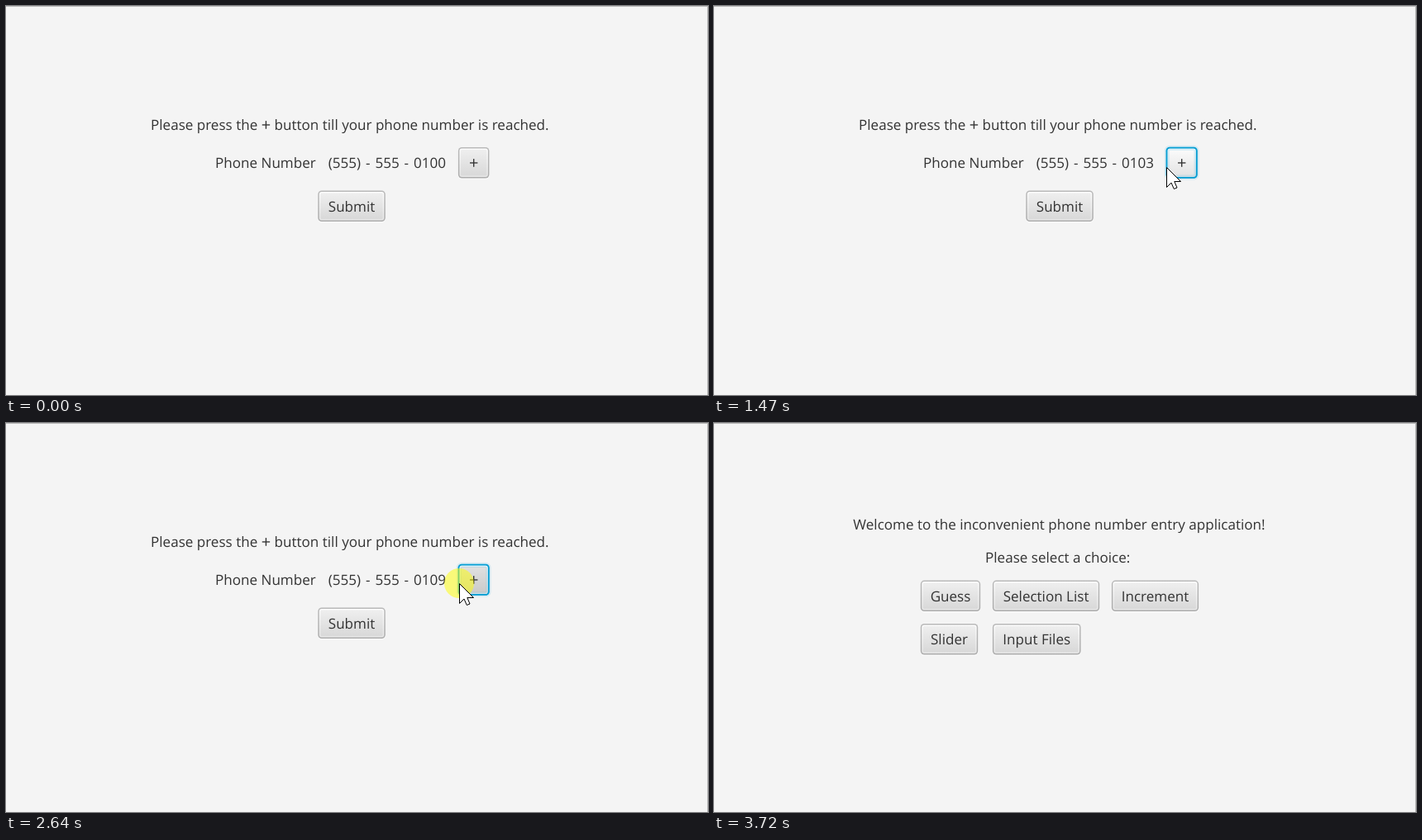
Animation of 849 by 471 pixels, one loop 3810 ms. Source, as an HTML page:

```html
<!DOCTYPE html>
<html lang="en">
<head>
<meta charset="utf-8">
<title>Phone number entry</title>
<style>
  html, body { margin: 0; width: 100%; height: 100%; overflow: hidden; background: #f4f4f4; }
  svg { display: block; width: 849px; height: 471px; }
  text { font: 17.07px "Open Sans", "Noto Sans", sans-serif; fill: #333; text-rendering: geometricPrecision; }
  .button text { text-anchor: middle; }
  .plus { font-size: 20px; baseline-shift: -1px; }
  #number { word-spacing: 1.5px; }
  .edge { fill: #b9b9b9; }
  .shadow { fill: #fff; opacity: .5; }
  .border { fill: url(#outer); }
  .bevel { fill: url(#inner); }
  .body { fill: url(#normal); }
  .hover .body { fill: url(#hover); }
  .pressed .body { fill: url(#pressed); }
  .ring, .glow { display: none; }
  .focused .ring, .focused .glow { display: inline; }
  .ring { fill: #039ed3; }
  .glow { fill: #039ed3; opacity: .13; }
  #halo { fill: #ff0; opacity: .5; }
  #arrow { fill: #fff; stroke: #000; stroke-width: 1; stroke-linejoin: round; }
</style>
</head>
<body>
<svg viewBox="0 0 849 471">
  <defs id="defs"></defs>
  <rect width="849" height="471" fill="#f4f4f4"/>
  <g id="counter">
    <text x="175" y="150">Please press the <tspan class="plus">+</tspan> button till your phone number is reached.</text>
    <text x="253" y="196">Phone Number</text>
    <text id="number" x="389.7" y="196"></text>
  </g>
  <g id="menu">
    <text x="168.3" y="129">Welcome to the inconvenient phone number entry application!</text>
    <text x="328" y="169">Please select a choice:</text>
  </g>
  <rect class="edge" width="849" height="1"/>
  <rect class="edge" x="848" width="1" height="471"/>
  <g id="pointer">
    <circle id="halo" r="18"/>
    <path id="arrow" d="M.5 .5V24.5L6 19L9.3 26.5L13 25L9.8 17.5H17.5Z"/>
  </g>
</svg>
<script>
const LOOP = 3810;
const MENU_AT = 3110;
const LEAVE_AT = 3720;
const SUBMIT_AT = 3030;

const byId = id => document.getElementById(id);

function make(parent, tag, attrs) {
  const node = document.createElementNS("http://www.w3.org/2000/svg", tag);
  for (const key in attrs) node.setAttribute(key, attrs[key]);
  return parent.appendChild(node);
}

function gradient(id, top, bottom) {
  const node = make(byId("defs"), "linearGradient", { id, x2: 0, y2: 1 });
  make(node, "stop", { offset: 0, "stop-color": top });
  make(node, "stop", { offset: 1, "stop-color": bottom });
}

gradient("outer", "#b9b9b9", "#acacac");
gradient("inner", "#fdfdfd", "#e6e6e6");
gradient("normal", "#eeeeee", "#d9d9d9");
gradient("hover", "#fafafa", "#e4e4e4");
gradient("pressed", "#dfdfdf", "#cbcbcb");

function button(parent, label, x, y, w, labelClass = "") {
  const h = 37.5;
  const node = make(parent, "g", { class: "button" });
  const layer = (name, inset, rx, dy = 0) => make(node, "rect", {
    class: name, x: x + inset, y: y + inset + dy,
    width: w - 2 * inset, height: h - 2 * inset, rx
  });
  layer("shadow", 0, 4.5, 1.5);
  layer("border", 0, 4.5);
  layer("ring", -.3, 4.5);
  layer("bevel", 1.5, 3);
  layer("body", 3, 1.5);
  layer("glow", -2.1, 6);
  layer("body", 3.9, 1);
  const text = make(node, "text", { x: x + w / 2, y: y + 25.3 });
  make(text, "tspan", { class: labelClass }).textContent = label;
  return {
    contains: p => p && p[0] >= x && p[0] <= x + w && p[1] >= y && p[1] <= y + h,
    show(states) {
      for (const name in states) node.classList.toggle(name, states[name]);
    }
  };
}

const plus = button(byId("counter"), "+", 546.9, 171, 37.5, "plus");
const submit = button(byId("counter"), "Submit", 377.3, 223.5, 81.5);
const guess = button(byId("menu"), "Guess", 249.8, 190.6, 72.4);
button(byId("menu"), "Selection List", 336.9, 190.6, 129.3);
button(byId("menu"), "Increment", 480.9, 190.6, 105.2);
button(byId("menu"), "Slider", 249.8, 243, 69.4);
const files = button(byId("menu"), "Input Files", 336.9, 243, 106.7);

// Press and release times of the + button
const clicks = [
  [1083, 1160], [1240, 1317], [1393, 1470], [1620, 1700], [1770, 1850],
  [1950, 2025], [2100, 2180], [2255, 2330], [2480, 2560], [2640, 2717]
];

const easeOut = k => 1 - (1 - k) ** 2;
const easeBoth = k => k * k * (3 - 2 * k);

// Each move visits its path in a fixed number of positions, then rests
const moves = [
  { start: 80, end: 530, steps: 6, from: [539, 452], to: [463, 267], ease: easeOut },
  { start: 700, end: 1007, steps: 4, from: [466, 263], to: [547, 195], ease: easeBoth },
  { start: 2100, to: [547, 194] },
  { start: 2180, to: [548, 194] },
  { start: 2793, end: 2950, steps: 2, from: [530, 204], to: [440, 236], ease: easeBoth },
  { start: SUBMIT_AT, to: [438, 243] },
  { start: 3260, end: 3640, steps: 5, from: [452, 252], to: [726, 462], ease: easeBoth }
];

function pointerAt(t) {
  if (t >= LEAVE_AT) return null;
  const move = moves.filter(m => t >= m.start).pop();
  if (!move) return null;
  if (!move.steps || t >= move.end) return move.to;
  const { start, end, steps, from, to, ease } = move;
  const k = ease(Math.floor((t - start) / (end - start) * steps) / steps);
  return from.map((v, i) => Math.round(v + (to[i] - v) * k));
}

function draw(t) {
  const tip = pointerAt(t);
  const inMenu = t >= MENU_AT;
  const pressing = clicks.some(([down, up]) => t >= down && t < up);
  const submitting = t >= SUBMIT_AT && !inMenu;
  const count = clicks.filter(([, up]) => t >= up).length;

  byId("counter").style.display = inMenu ? "none" : "";
  byId("menu").style.display = inMenu ? "" : "none";
  byId("number").textContent = "(555) - 555 - 01" + String(count).padStart(2, "0");

  plus.show({
    hover: !!plus.contains(tip), pressed: pressing,
    focused: t >= clicks[0][0] && t < SUBMIT_AT
  });
  submit.show({ hover: !!submit.contains(tip), pressed: submitting, focused: submitting });
  guess.show({ focused: t < LEAVE_AT });
  files.show({ hover: !!files.contains(tip) });

  byId("pointer").style.display = tip ? "" : "none";
  if (tip) byId("pointer").setAttribute("transform", `translate(${tip})`);
  byId("halo").style.display = pressing || submitting ? "" : "none";
}

function tick() {
  draw(performance.now() % LOOP);
  requestAnimationFrame(tick);
}
tick();
</script>
</body>
</html>
```
